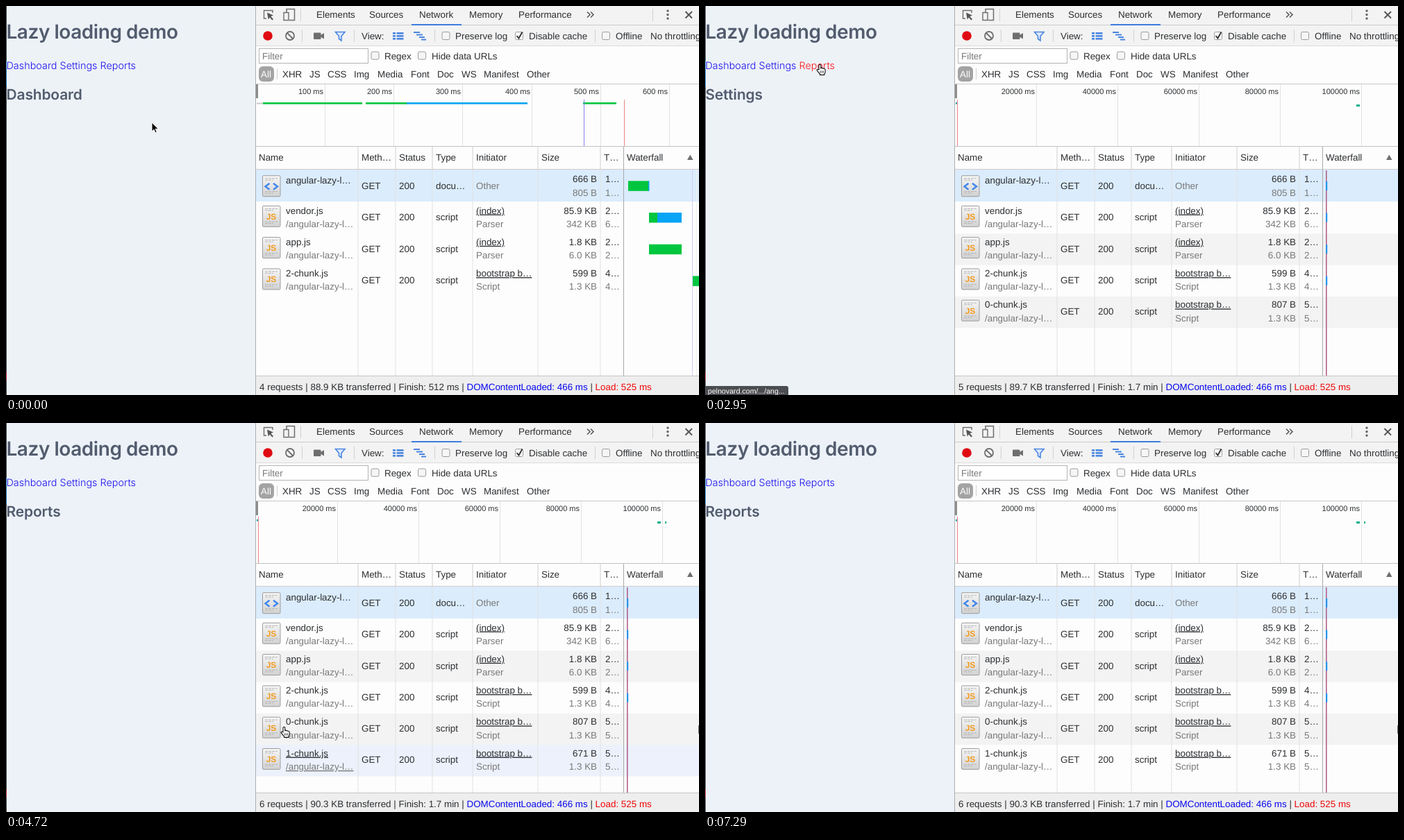
Write an HTML page that moves like this. It is 998 by 561 pixels and loops after 7.39 s.

```html
<!DOCTYPE html>
<html lang="en">
<head>
<meta charset="utf-8">
<title>Lazy loading demo</title>
<style>
html, body { margin: 0; height: 100%; overflow: hidden; background: #fff; }
svg { display: block; width: 100%; height: 100%; }
text { font: 13.4px "Liberation Sans", Arial, sans-serif; fill: #2c2e31; text-rendering: geometricPrecision; white-space: pre; }
.dim { fill: #787878; }
.u { text-decoration: underline; }
.end { text-anchor: end; }
.tick { font-size: 11px; text-anchor: end; }
.h1, .h2, .link { font-family: Inter, "Open Sans", sans-serif; fill: #525c6e; font-weight: 600; }
.h1 { font-size: 28px; letter-spacing: -.46px; }
.h2 { font-size: 21px; letter-spacing: -.17px; }
.link { font-size: 14.4px; font-weight: 300; fill: #1a10ee; }
.link.red { fill: #f8141c; }
.tip { font-size: 10.6px; fill: #fff; }
.blue { fill: #0808f0; }
.hot { fill: #f00808; }
.pill { fill: #fff; }
.js { font: bold 12px "Liberation Sans", Arial, sans-serif; fill: #f39c1f; text-anchor: middle; }
</style>
</head>
<body>
<svg viewBox="0 0 998 561" preserveAspectRatio="none">
  <defs>
    <linearGradient id="paper" x2="0" y2="1"><stop stop-color="#f6f6f6"/><stop offset="1" stop-color="#d2d2d2"/></linearGradient>
    <g id="arrow">
      <path d="M0 0V13l3-2.9 2 4.6 2.2-1-2-4.4h4.2z" fill="#000" stroke="#fff" stroke-width="1"/>
    </g>
    <g id="hand" stroke="#111" stroke-width="1.1" stroke-linejoin="round">
      <path fill="#fff" d="M-1 8V1.6a1.4 1.4 0 0 1 2.8 0V6l.3-.6q1.3-.6 2.1.5 1.5-.5 2.1.6 1.7-.2 1.9 1.3V11q0 2-1.4 3v1.4H.6V14Q-1.5 12-3.9 8.6-4 7.2-2.6 7.2-1.6 7.4-1 8z"/>
      <path d="M1.5 9.5V12.5M3.6 9.5V12.5M5.6 9.5V12.5" stroke-width=".8"/>
    </g>
  </defs>
  <g id="chrome"></g>
  <g id="scene"></g>
</svg>
<script>
const LOOP = 7390, STEP = 147.3;
const ROW_TOP = 236.5, ROW_H = 45.3;
const GREEN = '#00c63f', BLUE = '#08a4f5', ICON = '#4a86e0', GREY = '#6e6e6e';

const rect = (x, y, w, h, fill, more = '') => `<rect x="${x}" y="${y}" width="${w}" height="${h}" fill="${fill}" ${more}/>`;
const path = (d, stroke, width = 1, fill = 'none', more = '') =>
  `<path d="${d}" stroke="${stroke}" stroke-width="${width}" fill="${fill}" ${more}/>`;
const vline = (x, y1, y2, color) => rect(x, y1, 1, y2 - y1, color);
const hline = (y, color) => rect(360, y, 638, 1, color);
// y is the middle of the capitals
const text = (x, y, s, cls = '') => `<text x="${x}" y="${y + 4.7}" class="${cls}">${s}</text>`;
const labels = (y, list) => list.map(([x, s]) => text(x, y, s)).join('');
const box = (x, y, on) => rect(x, y, 11, 11, on ? '#fff' : '#f6f6f6', 'rx="2" stroke="#9b9b9b"') +
  (on ? path(`M${x + 2} ${y + 5.5}l3 3.5 5-9`, '#333', 1.9) : '');

const chrome = () => [
  rect(360, 0, 638, 57, '#f3f3f3'), rect(360, 57, 638, 179, '#fdfdfd'),
  hline(27, '#cbcbcb'), hline(57, '#dcdcdc'), hline(112, '#c8c8c8'),
  rect(584, 26, 72, 2, '#3c7cdc'),
  labels(12.5, [[447, 'Elements'], [523, 'Sources'], [595, 'Network'], [667, 'Memory'], [738, 'Performance']]),
  // top icons
  path('M375 18h-3.500V6.500H384V10', GREY, 1.4), path('M376 9.500l9 4-3.600 1.500 3.600 4-1.600 1.400-3.600-4-2 3z', 'none', 0, '#555'),
  path('M404 9V4.500H415.500V20.500H408', GREY, 1.5), path('M400 9.500H407V20.500H400z', GREY, 1.4),
  path('M837 8.500l4 4-4 4M842 8.500l4 4-4 4', '#555', 1.5),
  [7, 12.5, 18].map(y => `<circle cx="953" cy="${y}" r="1.700" fill="#666"/>`).join(''),
  path('M978.500 8l9.500 9.500M988 8l-9.500 9.500', '#555', 1.9),
  vline(424, 4, 22, '#d0d0d0'), vline(931, 4, 22, '#d0d0d0'),
  // network toolbar
  [426, 501, 617, 848].map(x => vline(x, 34, 52, '#d0d0d0')).join(''),
  '<circle cx="377" cy="43" r="6.800" fill="#e00b12"/>',
  '<circle cx="409" cy="43" r="6" fill="none" stroke="#6e6e6e" stroke-width="1.800"/>',
  path('M405 39l8 8', GREY, 1.8),
  rect(443, 38.5, 10.5, 9.5, GREY, 'rx="1"'), path('M453 42l5-3v8.500l-5-3z', 'none', 0, GREY),
  path('M474.500 37.500H488L483 43.500V50L479.500 47.500V43.500z', ICON, 1.6, '#dfeaff'),
  [38, 42, 46].map(y => rect(557, y, 4, 2.6, ICON) + rect(562.5, y, 10, 2.6, ICON)).join(''),
  [[587, 37, 9], [591, 40.5, 9], [595, 44, 8], [598, 47.5, 7]].map(([x, y, w]) => rect(x, y, w, 2, ICON)).join(''),
  box(628, 37.5), box(733.5, 37.5, true), box(858.5, 37.5),
  labels(43.5, [[512, 'View:'], [647, 'Preserve log'], [753, 'Disable cache'], [878, 'Offline'], [928, 'No throttling']]),
  // filters
  rect(364.5, 61.5, 157, 21, '#fff', 'stroke="#b4b4b4"'), text(369, 72.5, 'Filter', 'dim'),
  box(526, 66), box(593.5, 66), labels(72, [[545, 'Regex'], [613, 'Hide data URLs']]),
  rect(364, 87, 22, 22, '#a3a3a3', 'rx="6"'), text(367, 98, 'All', 'pill'), vline(390, 90, 106, '#d0d0d0'),
  labels(98.5, [[398, 'XHR'], [437, 'JS'], [463, 'CSS'], [501, 'Img'], [535, 'Media'], [583, 'Font'],
    [621, 'Doc'], [656, 'WS'], [688, 'Manifest'], [750, 'Other']]),
  // table head and footer
  hline(202, '#c2c2c2'), hline(235, '#cdcdcd'),
  labels(218.3, [[364, 'Name'], [512, 'Meth…'], [566, 'Status'], [619, 'Type'], [677, 'Initiator'],
    [771, 'Size'], [861, 'T…'], [894, 'Waterfall']]),
  path('M981 222h8.500l-4.200-7.500z', 'none', 0, GREY),
  rect(360, 533, 638, 28, '#eeeeee'), hline(533, '#c4c4c4')
].join('');

const ROWS = [
  ['angular-lazy-l…', 'docu…', '', 'Other', '666 B', '805 B', 1, 1],
  ['vendor.js', 'script', '(index)', 'Parser', '85.9 KB', '342 KB', 2, 6],
  ['app.js', 'script', '(index)', 'Parser', '1.8 KB', '6.0 KB', 2, 2],
  ['2-chunk.js', 'script', 'bootstrap b…', 'Script', '599 B', '1.3 KB', 4, 4],
  ['0-chunk.js', 'script', 'bootstrap b…', 'Script', '807 B', '1.3 KB', 5, 5],
  ['1-chunk.js', 'script', 'bootstrap b…', 'Script', '671 B', '1.3 KB', 5, 5]
];
const TOTALS = ['4 requests | 88.9 KB transferred | Finish: 512 ms',
  '5 requests | 89.7 KB transferred | Finish: 1.7 min',
  '6 requests | 90.3 KB transferred | Finish: 1.7 min'];

// [step, value] tables; a value holds until the next entry
const PAGE = [[0, 'Dashboard'], [8, 'Settings'], [21, 'Reports'], [37, 'Dashboard'], [40, 'Settings'], [45, 'Reports']];
const PRESSED = [[0, ''], [20, 'Reports'], [21, ''], [36, 'Dashboard'], [37, ''], [44, 'Reports'], [45, '']];
const LOADED = [[0, 0], [8, 1], [21, 2]];
const STRIPE = [[0, 998], [9, 943], [14, 360], [33, 998], [45, 360]];
const HOVER = [[0, -1], [13, 4], [16, -1], [25, 4], [27, 5], [33, -1]];
const TIP = [[0, 0], [5, 1], [14, .5], [15, 0], [18, 1], [26, .55], [27, 0], [34, 1], [46, .5], [47, 0]];
const POINTER = [[0, 'arrow'], [5, 'hand'], [11, 'arrow'], [18, 'hand'], [23, 'arrow'], [25, 'hand'],
  [33, 'arrow'], [35, 'hand'], [46, 'arrow'], [48, '']];
const MOVES = [[0, 210, 168], [1, 207, 164], [3, 150, 120], [5, 104, 91], [10, 104, 91], [12, 342, 341],
  [13, 440, 436], [15, 440, 440], [18, 167, 92], [19, 165, 84], [22, 165, 84], [25, 390, 428], [26, 407, 446],
  [28, 415, 485], [30, 415, 486], [32, 400, 438], [34, 70, 112], [35, 43, 90], [38, 42, 87], [40, 105, 88],
  [41, 105, 88], [43, 163, 86], [45, 163, 86], [48, 480, 560]];

const at = (table, k) => table.filter(e => e[0] <= k).pop()[1];
function pointerAt(k) {
  const i = MOVES.findIndex(m => m[0] > k);
  if (i < 0) return MOVES[MOVES.length - 1].slice(1);
  const [a, x, y] = MOVES[i - 1], [b, x2, y2] = MOVES[i], f = (k - a) / (b - a);
  return [x + (x2 - x) * f, y + (y2 - y) * f];
}

function fileIcon(y, html) {
  let s = rect(369.5, y, 25.5, 30, 'url(#paper)', 'rx="1.500" stroke="#9c9c9c"');
  for (let i = 0; i < 4; i++) {
    const ly = y + 4 + i * 2.4 + (i > 1 ? 14 : 0);
    s += path(`M373 ${ly}h${i % 2 ? 12 : 18}`, '#b0b0b0', .9, 'none', 'stroke-dasharray="4 1"');
  }
  return s + (html
    ? path(`M379.500 ${y + 11}l-6 4.500 6 4.500M385 ${y + 11}l6 4.500-6 4.500`, '#3f86ec', 2.4)
    : `<text x="382" y="${y + 19.5}" class="js">JS</text>`);
}

function row(r, i, hover) {
  const y = ROW_TOP + i * ROW_H, u = hover ? 'u' : '';
  const [name, type, from, by, size, full, t1, t2] = r;
  const top = y + 13, low = y + 32.3, mid = y + 22.7;
  const drop = i ? 0 : 1.7; // the document row sits a little lower
  return fileIcon(y + 6.5 + drop, !i) + text(403, top + drop, name, u) +
    (i ? text(403, low, '/angular-lazy-l…', 'dim ' + u) : '') +
    text(512, mid, 'GET') + text(566, mid, '200') + text(619, mid, type) +
    (from ? text(677, top, from, 'u') : '') + text(677, from ? low : mid, by, 'dim') +
    text(851, top, size, 'end') + text(851, low, full, 'dim end') +
    text(863, top, t1 + '…') + text(863, low, t2 + '…', 'dim');
}

function overview(n) {
  const gap = n ? 117 : 99.2, first = n ? 477 : 459, unit = n ? 20000 : 100;
  let s = '';
  for (let i = 0; i < (n ? 5 : 6); i++) {
    const x = Math.round(first + i * gap);
    s += vline(x, 113, 202, '#e2e2e2') + text(x - 2, 122.3, unit * (i + 1) + ' ms', 'tick');
  }
  s += rect(360, 113, 3, 20, '#8d8d8d');
  if (!n) {
    return s + rect(361, 139.5, 9, 2, '#c9c9c9') + rect(370, 139, 143, 2.6, GREEN) + rect(518, 139, 60, 2.6, GREEN) +
      rect(577, 139, 174, 2.6, BLUE) + rect(831, 139, 48, 2.6, GREEN) +
      vline(832, 135, 202, '#8582ee') + vline(890, 135, 202, '#f08585');
  }
  return s + rect(361, 139, 3, 2.6, '#14aab0') + vline(363, 135, 202, '#ee8088') +
    rect(938, 142, 5, 3, '#12b08c') + (n > 1 ? rect(949, 142, 2, 3, '#12b08c') : '');
}

function waterfall(n) {
  const bar = (x, i, w, color) => rect(x, 252.3 + i * 45.7, w, 14.5, color);
  if (!n) {
    return vline(988, 237, 533, '#cfcdf6') + vline(994, 237, 533, '#f0f0f0') +
      bar(896, 0, 30, GREEN) + bar(925, 0, 1.5, BLUE) + bar(926, 1, 12, GREEN) + bar(938, 1, 35, BLUE) +
      bar(926, 2, 47, GREEN) + bar(989, 3, 9, GREEN);
  }
  let s = rect(894, 237, 1.6, 296, '#b0628c');
  for (let i = 0; i < 4; i++) s += rect(894, 253 + i * 45.6, 2.2, 13, '#2693ea');
  return s + (n > 1 ? rect(997, 436, 1, 12, '#666') : '');
}

function scene(k) {
  const page = at(PAGE, k), n = at(LOADED, k), hover = at(HOVER, k), stripe = at(STRIPE, k);
  const pressed = at(PRESSED, k), tip = at(TIP, k), kind = at(POINTER, k), [px, py] = pointerAt(k);
  const rows = ROWS.slice(0, 4 + n);
  const fill = (i, x, color) => rect(x, ROW_TOP + 1.2 + i * ROW_H, 998 - x, ROW_H, color);
  let s = rect(0, 0, 359, 561, page === 'Reports' ? '#edf2f9' : '#edf2f7') + rect(0, 0, 1, 561, '#3b4048') +
    rect(0, 78, 1, 38, '#1b6fb0') + rect(0, 528, 1, 12, '#a33') + vline(359, 0, 561, '#adadad');
  s += '<text x="0.500" y="47" class="h1">Lazy loading demo</text><text x="0.500" y="90.700" class="link">' +
    ['Dashboard', 'Settings', 'Reports'].map(l => l === pressed ? `<tspan class="link red">${l}</tspan>` : l).join(' ') +
    `</text><text x="0.500" y="135" class="h2">${page}</text>`;

  s += overview(n) + rect(360, 236, 638, 297, '#fdfdfd') + rect(360, 236, 638, 46, '#dbecfc');
  for (const i of [2, 4]) if (i < rows.length && stripe < 998) s += fill(i, stripe, '#f3f3f3');
  if (hover > 0) s += fill(hover, 360, '#ecf1fb');
  s += [507, 561, 614, 672, 766, 856].map(x => vline(x - .5, 203, 235, '#cfcfcf') + vline(x - .5, 236, 533, '#e2e2e2')).join('');
  s += vline(889, 203, 533, '#a9a9a9') + waterfall(n);
  s += rows.map((r, i) => row(r, i, i === hover)).join('');
  s += `<text x="365" y="553.800">${TOTALS[n]} | <tspan class="blue">DOMContentLoaded: 466 ms</tspan> | <tspan class="hot">Load: 525 ms</tspan></text>`;

  if (tip) {
    s += `<g opacity="${tip}"><path d="M0 548H117q3 0 3 3V561H0z" fill="#4b4d50"/>` +
      '<text x="4" y="558.700" class="tip">pelnovard.com/.../ang...</text></g>';
  }
  return s + (kind ? `<use href="#${kind}" x="${px}" y="${py}"/>` : '');
}

const layer = document.getElementById('scene');
document.getElementById('chrome').innerHTML = chrome();
const start = performance.now();
let shown = -1;
function draw() {
  const k = Math.floor((performance.now() - start) % LOOP / STEP);
  if (k !== shown) layer.innerHTML = scene(shown = k);
  requestAnimationFrame(draw);
}
draw();
</script>
</body>
</html>
```
